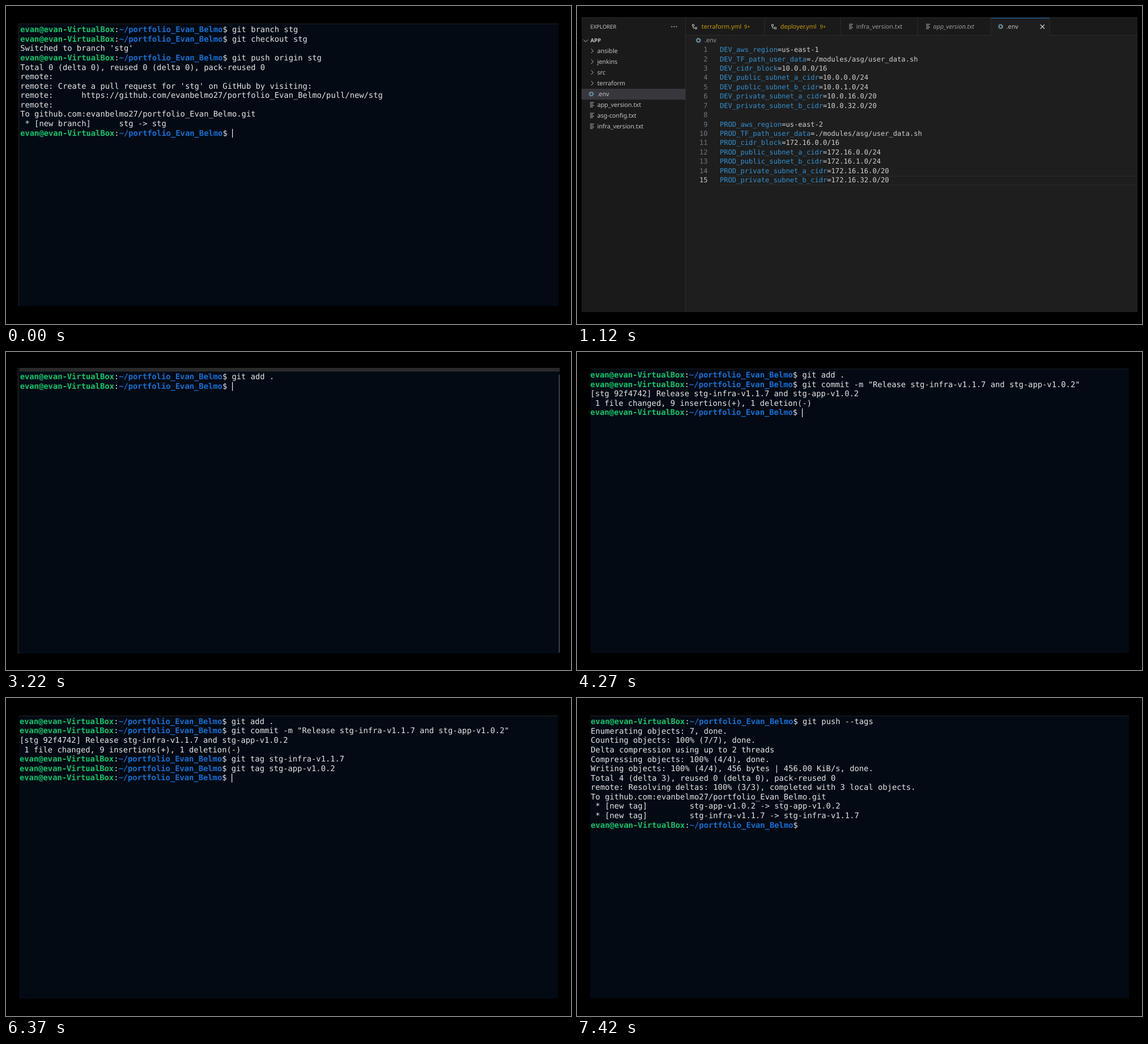
These frames come from a looping animation (997x561 px, 8 s). An HTML page:

```html
<!DOCTYPE html>
<html lang="en">
<head>
<meta charset="utf-8">
<title>Staging release</title>
<style>
html, body { margin: 0; width: 100%; height: 100%; overflow: hidden; background: #000; }
svg { display: block; width: 100%; height: 100%; }
text { white-space: pre; text-rendering: geometricPrecision; }
.term { font: 13.8px "DejaVu Sans Mono", monospace; fill: #e6e6e6; }
.user { font-weight: 700; fill: #0fc66b; }
.path { font-weight: 700; fill: #1470d2; }
.code { font: 12.1px "DejaVu Sans Mono", monospace; fill: #d0d0d0; }
.key { fill: #3590cf; }
.num { fill: #6e7681; text-anchor: end; }
.num.on { fill: #ccc; }
.ui { font: 10.75px "Noto Sans", sans-serif; fill: #c4c4c4; }
.small { font-size: 9.5px; }
.warn { fill: #c49a0a; }
.dim { fill: #9a9a9a; }
.line { fill: none; stroke: #c0c0c0; stroke-width: 1; }
</style>
</head>
<body>
<svg id="stage" viewBox="0 0 997 561" xmlns="http://www.w3.org/2000/svg"></svg>
<script>
const LOOP = 8000;
const LINE = 16.58, CELL = 8.308;

const rect = (x, y, w, h, fill) =>
  `<rect x="${x}" y="${y}" width="${w}" height="${h}" fill="${fill}"/>`;
const text = (x, y, cls, str) => `<text x="${x}" y="${y}" class="${cls}">${str}</text>`;
const path = (d, extra = '') => `<path class="line" d="${d}" ${extra}/>`;

// Terminal

const PROMPT = '<tspan class="user">evan@evan-VirtualBox</tspan>:' +
  '<tspan class="path">~/portfolio_Evan_Belmo</tspan>$ ';
const PROMPT_LEN = 45;

// Lines starting with "$ " get the coloured prompt.
function terminal({ box: [l, t, r, b], x, y, lines, cursor = true, frame = '' }) {
  const rows = lines.map((s, i) =>
    text(x, y + i * LINE, 'term', s.startsWith('$ ') ? PROMPT + s.slice(2) : s)).join('');
  const caretY = y + (lines.length - 1) * LINE - 11.8;
  const caret = cursor ? rect(Math.round(x + PROMPT_LEN * CELL), caretY, 1.2, 15.5, '#eee') : '';
  return rect(l, t, r - l, b - t, '#030a14') + frame + rows + caret;
}

const commitLog = [
  '$ git add .',
  '$ git commit -m "Release stg-infra-v1.1.7 and stg-app-v1.0.2"',
  '[stg 92f4742] Release stg-infra-v1.1.7 and stg-app-v1.0.2',
  ' 1 file changed, 9 insertions(+), 1 deletion(-)'
];
const tagInfra = '$ git tag stg-infra-v1.1.7';
const tagApp = '$ git tag stg-app-v1.0.2';

// Editor

const gear = (x, y) =>
  `<circle cx="${x}" cy="${y}" r="2.7" fill="none" stroke="#6d8fa3" stroke-width="1.7"/>` +
  `<circle cx="${x}" cy="${y}" r="4" fill="none" stroke="#6d8fa3" stroke-width="1.4" stroke-dasharray="1.57 1.57"/>`;
const textIcon = (x, y) => path(`M${x} ${y - 4}h7M${x} ${y - 1.4}h5M${x} ${y + 1.2}h7M${x} ${y + 3.8}h5`);
const treeIcon = (x, y) =>
  path(`M${x + 2} ${y - 1}v3.5h3M${x + 0.5} ${y - 4}h3v3h-3zM${x + 5.5} ${y + 1}h3v3h-3z`);
const chevron = (x, y) => path(`M${x - 2} ${y - 3.7}l3.8 3.7l-3.8 3.7`);

function sidebar() {
  const row = i => 79.2 + i * 19;
  const folders = ['ansible', 'jenkins', 'src', 'terraform'];
  const files = ['app_version.txt', 'asg-config.txt', 'infra_version.txt'];
  return rect(-60, 0, 251.5, 561, '#1a1a1a') + rect(191, 20, 1, 541, '#2d2d2d') +
    text(23.5, 39.8, 'ui small', 'EXPLORER') +
    [167.3, 171.3, 175.3].map(x => `<circle cx="${x}" cy="36.5" r=".9" fill="#c4c4c4"/>`).join('') +
    path('M11.5 59.5l3.8 3.8l3.8-3.8') +
    `<text x="23.8" y="64.4" class="ui small" font-weight="700" style="font-weight:700">APP</text>` +
    rect(-60, 146, 251, 19.2, '#37373d') +
    folders.map((s, i) => chevron(27, row(i)) + text(35.7, row(i) + 3.7, 'ui', s)).join('') +
    gear(25.2, row(4)) + text(35.7, row(4) + 3.7, 'ui', '.env') +
    files.map((s, i) => textIcon(23, row(i + 5)) + text(35.7, row(i + 5) + 3.7, 'ui', s)).join('');
}

function tabs(dirty) {
  const edges = [331, 465, 601, 730, 834];
  return rect(192, 20, 860, 31, '#1a1a1a') + rect(192, 51, 860, 1, '#2d2d2d') +
    rect(731, 20, 103, 32, '#1e1e1e') + rect(731, 20.5, 103, 1.5, '#1069b0') +
    edges.map(x => rect(x - 0.5, 21, 1, 30, '#2d2d2d')).join('') +
    treeIcon(203, 36.5) + text(219.8, 39.8, 'ui warn', 'terraform.yml') +
    text(294.8, 39.5, 'ui small warn', '9+') +
    treeIcon(343, 36.5) + text(358.8, 39.8, 'ui warn', 'deployer.yml') +
    text(428.5, 39.5, 'ui small warn', '9+') +
    textIcon(480, 36.2) + text(492.7, 39.8, 'ui dim', 'infra_version.txt') +
    textIcon(616, 36.2) +
    `<text x="628.6" y="39.8" class="ui dim" style="font-style:italic">app_version.txt</text>` +
    gear(747.6, 36.2) + text(757.7, 39.8, 'ui', '.env') +
    (dirty ? '<circle cx="821.4" cy="36.2" r="4" fill="#fff"/>'
           : path('M817.6 32.8l7.4 7.4m0-7.4l-7.4 7.4', 'style="stroke:#e4e4e4;stroke-width:1.2"'));
}

function envBlock(name, region, net) {
  return [
    ['aws_region', region],
    ['TF_path_user_data', './modules/asg/user_data.sh'],
    ['cidr_block', net + '.0.0/16'],
    ['public_subnet_a_cidr', net + '.0.0/24'],
    ['public_subnet_b_cidr', net + '.1.0/24'],
    ['private_subnet_a_cidr', net + '.16.0/20'],
    ['private_subnet_b_cidr', net + '.32.0/20']
  ].map(([k, v]) => `<tspan class="key">${name}_${k}</tspan>=${v}`);
}

function editor({ id, box: [l, t, r, b], dx, dy, lines, dirty }) {
  const base = i => 81.2 + i * 16.42;
  const last = lines.length - 1;
  const top = base(last) - 11.4;
  const rows = lines.map((s, i) =>
    text(230.5, base(i), 'code num' + (i === last ? ' on' : ''), i + 1) +
    text(252, base(i), 'code', s)).join('');
  return `<clipPath id="${id}"><rect x="${l}" y="${t}" width="${r - l}" height="${b - t}"/></clipPath>` +
    `<g clip-path="url(#${id})">` + rect(l, t, r - l, b - t, '#1e1e1e') +
    `<g transform="translate(${dx} ${dy})">` + sidebar() + tabs(dirty) +
    gear(214.3, 60.6) + text(225, 64.2, 'ui dim', '.env') +
    rect(252, top, 800, 1, '#2c2c2c') + rect(252, top + 15.6, 800, 1, '#2c2c2c') + rows +
    (dirty ? rect(544.2, top + 0.5, 1.2, 15.5, '#c8c8c8') : '') + '</g></g>';
}

const env = [...envBlock('DEV', 'us-east-1', '10.0').map(s => s.replace('10.0.0.0/16', '10.0.0.0/16')),
  '', ...envBlock('PROD', 'us-east-2', '172.16')];
const envStg = [...env, '', ...envBlock('STG', 'us-west-2', '172.16')];

const scenes = [
  [0, terminal({
    box: [22, 31, 975, 529.5], x: 25.2, y: 46.2,
    frame: rect(22, 31, 953, 1, '#1c1f22') + rect(22, 31, 1, 498, '#25282b'),
    lines: [
      '$ git branch stg',
      '$ git checkout stg',
      "Switched to branch 'stg'",
      '$ git push origin stg',
      'Total 0 (delta 0), reused 0 (delta 0), pack-reused 0',
      'remote:',
      "remote: Create a pull request for 'stg' on GitHub by visiting:",
      'remote:      https://github.com/evanbelmo27/portfolio_Evan_Belmo/pull/new/stg',
      'remote:',
      'To github.com:evanbelmo27/portfolio_Evan_Belmo.git',
      ' * [new branch]      stg -&gt; stg',
      '$ '
    ]
  })],
  [1120, editor({ id: 'before', box: [8, 20, 989, 540], dx: 0, dy: 0, lines: env }) +
    rect(8, 20, 981, 1, '#2b2b2b')],
  [2170, editor({ id: 'after', box: [58, 37, 939, 524], dx: 46.4, dy: 13.6, lines: envStg, dirty: true }) +
    '<rect x="284.7" y="335.8" width="389.6" height="138.4" rx="3" fill="none" stroke="#7ee035" stroke-width="4"/>'],
  [3220, terminal({
    box: [21, 28, 977, 532], x: 24.7, y: 48.2,
    frame: rect(24, 28, 953, 6.5, '#2a2a2a') + rect(20.5, 28, 2, 504, '#1f1f1f') +
      rect(975.7, 40, 1, 490, '#777'),
    lines: ['$ git add .', '$ ']
  })],
  [4270, terminal({
    box: [24, 29.5, 974, 531], x: 23.6, y: 45,
    frame: rect(24, 29.5, 950, 1, '#1c1f22'),
    lines: [...commitLog, '$ ']
  })],
  [5320, terminal({
    box: [24, 30, 973, 530.5], x: 23.4, y: 45.2,
    frame: rect(24, 30, 949, 1, '#1c1f22'),
    lines: [...commitLog, tagInfra, '$ ']
  })],
  [6370, terminal({
    box: [23, 31, 974, 530], x: 24, y: 45.8,
    frame: rect(23, 31, 951, 1, '#1c1f22'),
    lines: [...commitLog, tagInfra, tagApp, '$ ']
  })],
  [7420, terminal({
    box: [23.3, 31, 974, 529.5], x: 24.3, y: 46.2, cursor: false,
    frame: rect(23.3, 31, 950.7, 1, '#1c1f22'),
    lines: [
      '$ git push --tags',
      'Enumerating objects: 7, done.',
      'Counting objects: 100% (7/7), done.',
      'Delta compression using up to 2 threads',
      'Compressing objects: 100% (4/4), done.',
      'Writing objects: 100% (4/4), 456 bytes | 456.00 KiB/s, done.',
      'Total 4 (delta 3), reused 0 (delta 0), pack-reused 0',
      'remote: Resolving deltas: 100% (3/3), completed with 3 local objects.',
      'To github.com:evanbelmo27/portfolio_Evan_Belmo.git',
      ' * [new tag]         stg-app-v1.0.2 -&gt; stg-app-v1.0.2',
      ' * [new tag]         stg-infra-v1.1.7 -&gt; stg-infra-v1.1.7',
      '$ '
    ]
  })]
];

const stage = document.getElementById('stage');
stage.innerHTML = rect(0, 0, 997, 561, '#000') +
  scenes.map(([, body]) => `<g class="scene" visibility="hidden">${body}</g>`).join('');
const groups = [...stage.querySelectorAll('.scene')];

function draw(ms) {
  const now = scenes.findLastIndex(([start]) => start <= ms);
  groups.forEach((g, i) => g.setAttribute('visibility', i === now ? 'visible' : 'hidden'));
}

const t0 = performance.now();
function tick() {
  draw((performance.now() - t0) % LOOP);
  requestAnimationFrame(tick);
}
draw(0);
requestAnimationFrame(tick);
</script>
</body>
</html>
```
